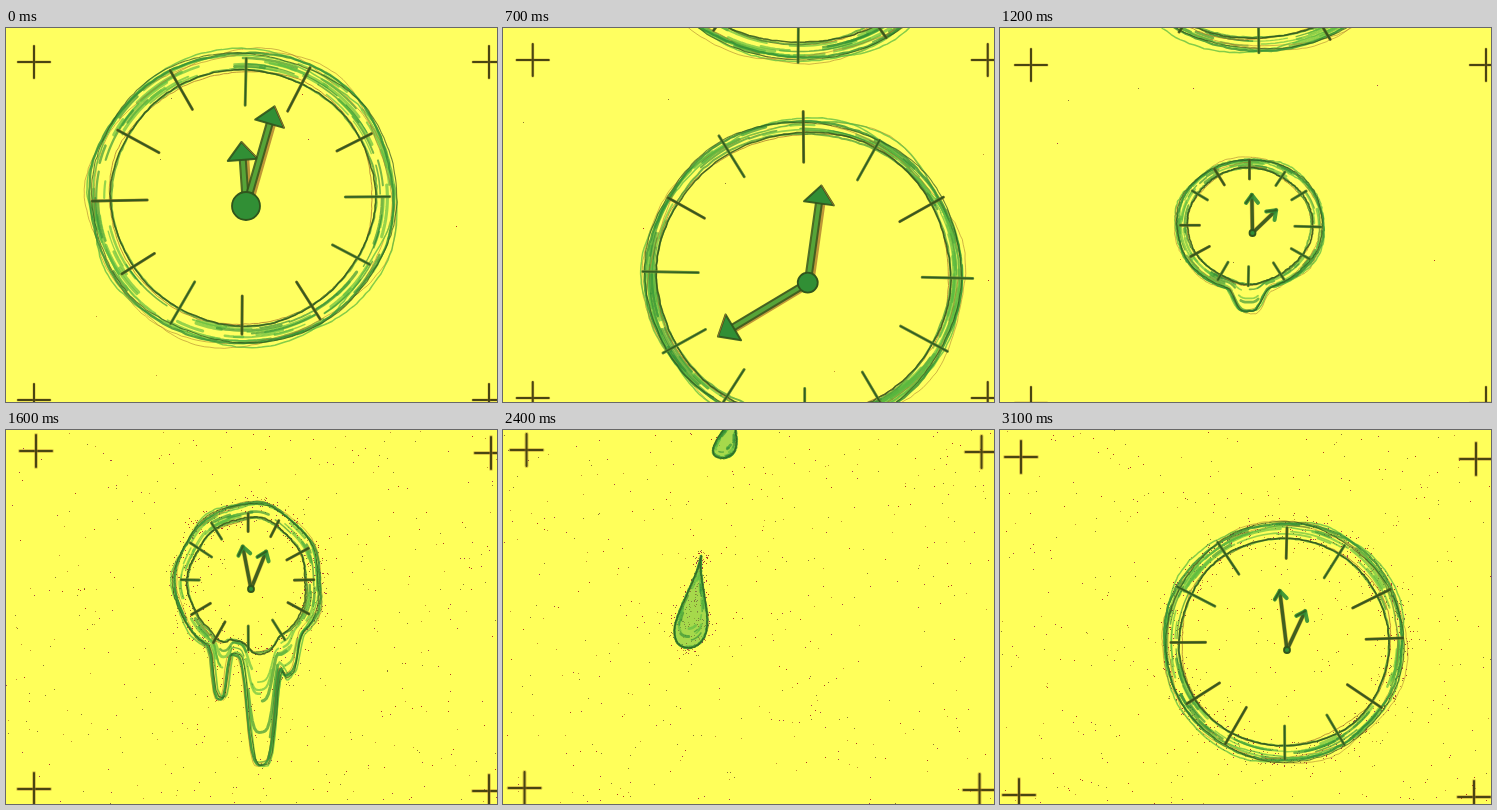
An HTML page with a canvas for the animation above (3.2 s loop, 491x374 px).

```html
<!DOCTYPE html>
<html lang="en">
<head>
<meta charset="utf-8">
<title>Melting clock</title>
<style>
html, body { margin: 0; width: 100%; height: 100%; overflow: hidden; background: #ffff60; }
canvas { display: block; }
</style>
</head>
<body>
<canvas id="stage" width="491" height="374"></canvas>
<script>
const ctx = document.getElementById('stage').getContext('2d');
const W = 491, H = 374, STEP = 100, COUNT = 32, SAMPLES = 200;
const COLUMNS = 4, SHEET = 16, ROW = 338, PITCH = 455;
const LIGHT = '#5dbb40', GREEN = '#318f35', DARK = '#30551c', BROWN = '#a8752a', INK = '#494512';

function random(seed) {
  let s = (seed * 2654435761) >>> 0;
  return () => {
    s = (s + 0x6D2B79F5) | 0;
    let t = Math.imul(s ^ (s >>> 15), 1 | s);
    t = (t + Math.imul(t ^ (t >>> 7), 61 | t)) ^ t;
    return ((t ^ (t >>> 14)) >>> 0) / 4294967296;
  };
}

// Value at n on a path of time, value pairs.
function track(n, ...keys) {
  if (n <= keys[0]) return keys[1];
  for (let i = 2; i < keys.length; i += 2) {
    const [t0, a, t1, b] = keys.slice(i - 2, i + 2);
    if (n <= t1) return a + (b - a) * (n - t0) / (t1 - t0);
  }
  return keys[keys.length - 1];
}

const mix = (a, b, u) => a.map((v, i) => v + (b[i] - v) * u);
const polar = ([x, y], degrees, rx, ry = rx) => {
  const a = degrees * Math.PI / 180;
  return [x + Math.sin(a) * rx, y - Math.cos(a) * ry];
};

// An oval that can lump, run down in drips and narrow into a teardrop.
function blob({ x, y, rx, ry, taper = 0, lump = 0, drips = [] }, scale = 1, run = 1) {
  return Array.from({ length: SAMPLES }, (_, i) => {
    const angle = i / SAMPLES * 360, a = angle * Math.PI / 180;
    const size = scale * (1 + lump * (Math.sin(3 * a + 1) + Math.sin(7 * a)));
    let [px, py] = polar([0, 0], angle, rx * size, ry * size);
    const high = (1 + Math.cos(a)) / 2;
    if (py > 0) {
      for (const d of drips) py += run * d.length * Math.exp(-(((px - d.x) / d.width) ** 4));
    }
    px = px * (1 - taper * (1 - (1 - high) ** 1.3)) + taper * 13 * high;
    return [x + px, y + py];
  });
}

function poseAt(n) {
  const column = n % COLUMNS;
  const rx = track(n, 0, 152, 3, 163, 7, 158, 8, 150, 12, 73, 16, 73, 20, 69, 24, 27, 31, 119);
  const side = track(n, 13, 0, 16, 48, 20, 14, 23, 0);
  const body = {
    // Drawings sit a little further right and down in each column of the sheet.
    x: track(n, 0, 237, 4, 256, 8, 257, 16, 242, 20, 234, 24, 185, 31, 239) + column * 15,
    y: track(n, 0, 170, 3, 201, 8, 228, 12, 197, 16, 151, 20, 174, 24, 172, 31, 188) + column * 8,
    rx,
    ry: rx * track(n, 0, 0.96, 3, 0.88, 7, 0.97, 8, 0.88, 12, 0.9, 16, 1.05, 20, 1.25, 24, 1.7, 28, 1),
    taper: track(n, 20, 0, 24, 1, 28, 0),
    lump: track(n, 12, 0, 20, 0.03, 24, 0),
    drips: [
      { x: track(n, 12, -1, 16, 14, 20, -8), width: 15, length: track(n, 10, 0, 12, 21, 16, 108, 20, 52, 24, 0) },
      { x: -28, width: 8, length: side },
      { x: 42, width: 9, length: side * 0.65 }
    ]
  };
  const rim = track(n, 0, 0.87, 7, 0.93, 12, 0.86, 20, 0.77, 24, 0.5, 28, 0.88);
  return {
    centre: [body.x, body.y], hub: [body.x + 3, body.y + 8], rx, ry: body.ry, rim,
    outer: blob(body), inner: blob(body, rim, 0.1),
    dial: track(n, 22, 1, 24, 0, 26, 0, 28, 1),
    bold: track(n, 8, 1, 12, 0),
    minute: [track(n, 0, 16, 7, 239, 12, 359, 16, 349, 20, 364, 31, 353), track(n, 0, 0.71, 8, 0.68, 12, 0.58, 31, 0.5)],
    hour: [track(n, 0, -4, 7, 8, 12, 46, 16, 22, 20, 34, 31, 25), track(n, 0, 0.44, 7, 0.64, 12, 0.5, 20, 0.55, 31, 0.36)]
  };
}

function stroke(points, color, width, alpha = 1, close = false) {
  ctx.beginPath();
  points.forEach(p => ctx.lineTo(...p));
  if (close) ctx.closePath();
  ctx.strokeStyle = color;
  ctx.lineWidth = width;
  ctx.globalAlpha = alpha;
  ctx.stroke();
  ctx.globalAlpha = 1;
}

function fill(points, color, alpha = 1) {
  ctx.beginPath();
  points.forEach(p => ctx.lineTo(...p));
  ctx.fillStyle = color;
  ctx.globalAlpha = alpha;
  ctx.fill();
  ctx.globalAlpha = 1;
}

function loose(points, rnd, amount) {
  const [a, b, c] = [rnd() * 6.3, rnd() * 6.3, rnd() * 6.3];
  return points.map(([x, y], i) => {
    const t = i / points.length * Math.PI * 2;
    return [x + amount * (Math.sin(2 * t + a) + 0.4 * Math.sin(7 * t + c)) + rnd() * 0.8 - 0.4,
            y + amount * (Math.sin(3 * t + b) + 0.4 * Math.sin(5 * t + a)) + rnd() * 0.8 - 0.4];
  });
}

function drawRing(outer, inner, size, rnd) {
  const wobble = Math.min(3, size / 45);
  const sketch = (points, color, width, alpha, amount) =>
    stroke(loose(points, rnd, amount * wobble), color, width, alpha, true);
  for (let i = 0; i < 25 + size * 0.5; i++) {
    const start = Math.floor(rnd() * SAMPLES), depth = rnd() * 0.85, run = 4 + rnd() * 12;
    const line = [];
    for (let k = 0; k < run; k++) {
      const j = (start + k) % SAMPLES;
      line.push(mix(outer[j], inner[j], depth));
    }
    stroke(line, rnd() < 0.6 ? LIGHT : GREEN, 1.2 + rnd() * 2, 0.65);
  }
  for (let i = 0; i < 2; i++) {
    sketch(outer, BROWN, 0.9, 0.6, 1.6);
    sketch(outer, LIGHT, 1.5, 0.75, 1.5);
  }
  sketch(outer, GREEN, 2.3, 0.8, 0.6);
  sketch(outer, DARK, 1.1, 0.7, 0.7);
}

function drawRim(inner, size, rnd) {
  const wobble = Math.min(2.5, size / 45);
  stroke(loose(inner, rnd, wobble), BROWN, 1, 0.75, true);
  stroke(loose(inner, rnd, wobble * 0.6), GREEN, 2, 0.65, true);
  stroke(loose(inner, rnd, wobble * 0.5), DARK, 1.6, 0.85, true);
}

function drawTicks({ centre, rx, ry, rim, dial }, rnd) {
  for (let i = 0; i < 12; i++) {
    const angle = i * 30 + (i % 3 ? rnd() * 8 - 4 : rnd() * 4 - 2);
    const at = reach => polar(centre, angle, rx * rim * reach, ry * rim * reach);
    const line = [at(1.07 + rnd() * 0.08), at(1 - (0.18 + rnd() * 0.1) * dial)];
    stroke(line, BROWN, 3, 0.65);
    stroke(line, rnd() < 0.5 ? GREEN : DARK, 2.6, 0.7);
    stroke(line, DARK, 1.4, 0.9);
  }
}

function drawHand(hub, angle, length, bold) {
  const tip = polar(hub, angle, length);
  const back = 8 + bold * 10, spread = 6 + bold * 9;
  const base = polar(hub, angle, length - back);
  const wings = [polar(base, angle - 90, spread), polar(base, angle + 90, spread)];
  if (bold > 0.4) {
    stroke([hub, base].map(([x, y]) => [x + 2, y]), BROWN, 9, 0.75);
    stroke([hub, base], DARK, 8, 0.85);
    stroke([hub, base], LIGHT, 4, 0.75);
    fill([tip, ...wings], GREEN);
    stroke([tip, ...wings], DARK, 2, 0.9, true);
    stroke([tip, wings[1]], BROWN, 1, 0.8);
  } else {
    stroke([hub, tip], BROWN, 4.5, 0.5);
    stroke([hub, tip], DARK, 3.4, 0.9);
    stroke([wings[0], tip, wings[1]], GREEN, 4, 0.9);
    stroke([wings[0], tip], DARK, 2, 0.8);
  }
}

function drawHub([x, y], r) {
  ctx.beginPath();
  ctx.arc(x, y, r, 0, 7);
  ctx.fillStyle = GREEN;
  ctx.fill();
  ctx.strokeStyle = DARK;
  ctx.lineWidth = 1.8;
  ctx.stroke();
}

function speck(x, y, rnd) {
  ctx.fillStyle = ['#b23822', '#c49330', '#8e7832', '#a84347'][Math.floor(rnd() * 4)];
  ctx.fillRect(Math.round(x), Math.round(y), 1, 1);
}

function drawHalo(points, count, rnd) {
  for (let i = 0; i < count; i++) {
    const [x, y] = points[Math.floor(rnd() * SAMPLES)];
    const spread = 7 + 18 * rnd() * rnd();
    speck(x + (rnd() + rnd() - 1) * spread, y + (rnd() + rnd() - 1) * spread, rnd);
  }
}

function drawTeardrop(outer, inner, rnd) {
  fill(outer, LIGHT, 0.55);
  drawRing(outer, inner, 14, rnd);
}

function drawClock(n) {
  const pose = poseAt(n), rnd = random(n + 1), { outer, inner, rx, ry, hub, bold } = pose;
  if (n >= SHEET) {
    drawHalo(outer, 60 + rx * 5, rnd);
    drawHalo(inner, rx * 2.5, rnd);
  }
  if (pose.dial > 0.25) {
    drawRing(outer, inner, rx, rnd);
    drawRim(inner, rx, rnd);
    drawTicks(pose, rnd);
    for (const [angle, reach] of [pose.hour, pose.minute]) drawHand(hub, angle, reach * ry * pose.dial, bold);
    drawHub(hub, 3 + bold * track(n, 0, 11, 7, 7));
  } else {
    drawTeardrop(outer, inner, rnd);
  }
  if (n === 20) {
    const drop = { x: 219, y: 344, rx: 18, ry: 22, taper: 0.9 };
    drawTeardrop(blob(drop), blob(drop, 0.5), rnd);
  }
}

function drawMarks(n) {
  const grainy = n >= SHEET, skew = grainy ? 2 : 0;
  const x = track(n, 0, 28, 12, 31, 16, 30, 20, 25, 31, 21);
  const y = track(n, 0, 34, 7, 32, 12, 37, 15, 37, 16, 21, 24, 20, 31, 27);
  for (const column of [0, 1]) for (const row of [0, 1]) {
    const cx = x + column * PITCH - row * skew, cy = y + column * skew + row * ROW;
    for (const [dx, dy] of [[16, 0], [0, 16]]) {
      const line = [[cx - dx, cy - dy], [cx + dx, cy + dy]];
      stroke(line, BROWN, grainy ? 4 : 3, 0.4);
      stroke(line, INK, 2);
    }
  }
}

function drawFrame(n) {
  const grainy = n >= SHEET, rnd = random(n + 500);
  ctx.fillStyle = grainy ? '#ffff5a' : '#ffff60';
  ctx.fillRect(0, 0, W, H);
  for (let i = 0; i < (grainy ? 420 : 8); i++) speck(rnd() * W, rnd() * H, rnd);
  drawMarks(n);
  // The drawing one row up on the same sheet peeks in at the top.
  if (n % SHEET >= COLUMNS) {
    ctx.save();
    ctx.translate(0, -ROW);
    drawClock(n - COLUMNS);
    ctx.restore();
  }
  drawClock(n);
}

ctx.lineCap = ctx.lineJoin = 'round';
let shown = -1;
function tick() {
  const n = Math.floor(performance.now() / STEP) % COUNT;
  if (n !== shown) drawFrame(shown = n);
  requestAnimationFrame(tick);
}
tick();
</script>
</body>
</html>
```
